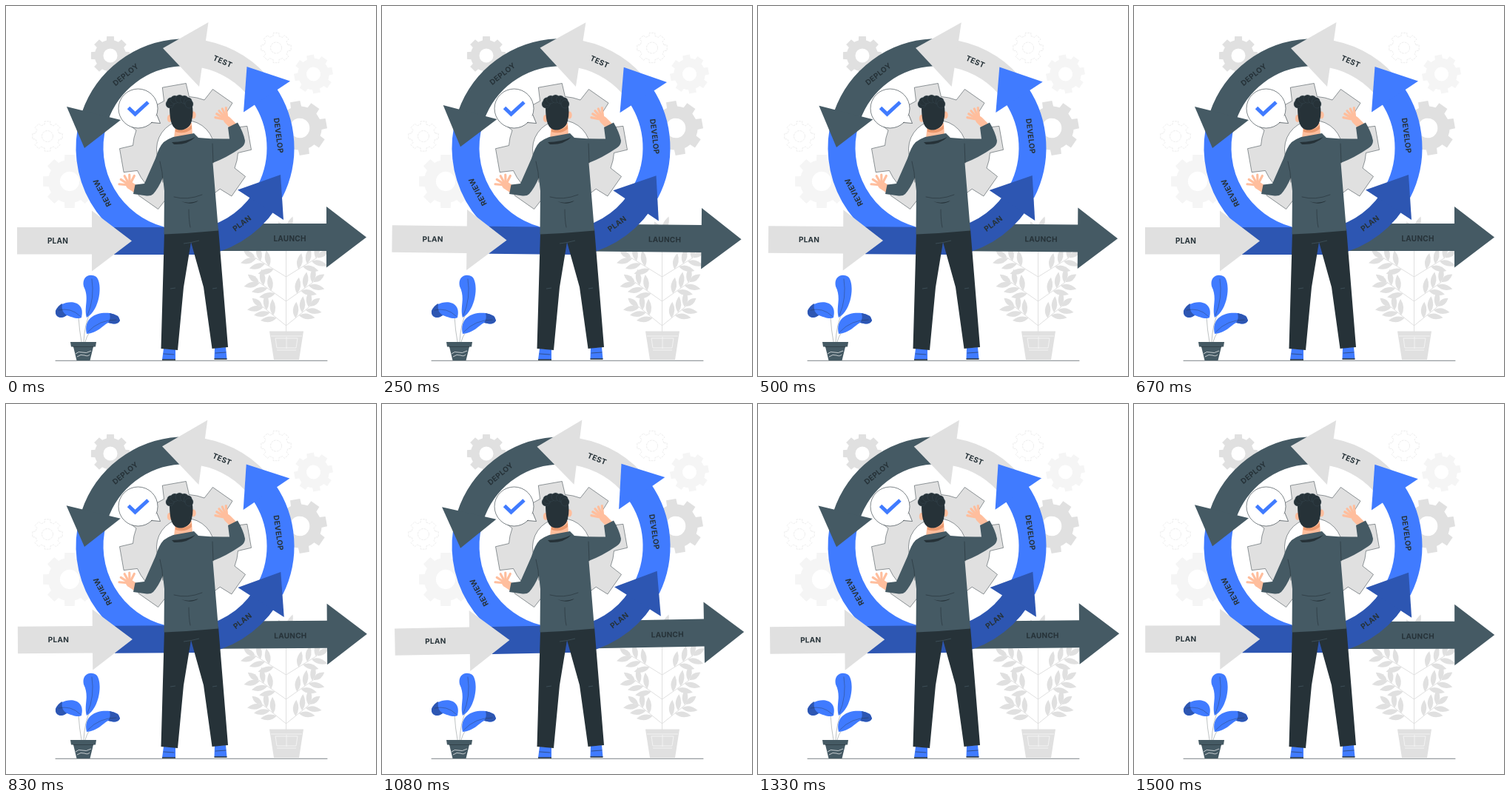
An HTML page that plays this animation: 500 by 500 pixels, repeating every 1540 ms.

```html
<!DOCTYPE html>
<html lang="en">
<head>
<meta charset="utf-8">
<title>Development cycle</title>
<style>
html, body { margin: 0; width: 100%; height: 100%; overflow: hidden; background: #fff }
svg { display: block; width: 100%; height: 100% }
text { font: 700 10px Inter, "Open Sans", sans-serif; letter-spacing: .25px; fill: #263238; text-anchor: middle }
.line { fill: none; stroke: #263238; stroke-width: .6; stroke-linecap: round; stroke-linejoin: round }
.skin { fill: #ffbe9d }
.hand { fill: none; stroke: #ffbe9d; stroke-linecap: round }
</style>
</head>
<body>
<svg viewBox="0 0 500 500">
  <g id="gears"></g>
  <g id="tree" fill="#e0e0e0"></g>
  <g id="cycle"></g>

  <g transform="translate(178.500 138.500)">
    <circle r="26.500" fill="#fff" stroke="#263238" stroke-width=".6"/>
    <path d="M25 9L30 20L18 18" fill="#fff" class="tail"/>
    <path d="M25.500 9L30 20L18 19" class="line"/>
    <path d="M-13 -1L-4 7.500L13.500 -8.500" fill="none" stroke="#407bff" stroke-width="5"/>
  </g>

  <path d="M67 479.300H434" class="line"/>

  <g id="plant">
    <path d="M102 454Q99 438 98 420M105 454Q106 430 114 414M107 454Q110 442 119 434" class="line" stroke-opacity=".5"/>
    <g fill="#407bff">
      <path d="M109 421C105 407 113 395 105 379C102 366 113 360 122 366C131 375 127 411 109 421Z"/>
      <path d="M102 421C97 424 88 420 82 418C74 424 66 420 67 412C74 396 109 394 102 421Z"/>
      <path d="M109 443C104 420 124 413 140 415Q153 417 154 425C151 431 145 430 138 428C130 432 124 442 109 443Z"/>
    </g>
    <path d="M82 418C74 424 66 420 67 412Q70 405 76 402Q74 413 82 418ZM154 425Q151 432 138 428Q142 423 140 415Q153 417 154 425Z" fill="#2d56b2"/>
    <path d="M110 418Q120 395 116 369M100 419Q88 407 71 411M111 440Q126 424 149 424" class="line" stroke-opacity=".6"/>
    <path d="M87 454H122L121 460.500H118L113.500 479H95.500L91 460.500H88Z" fill="#455a64"/>
    <path d="M91 460.500H118" class="line"/>
    <path d="M94 470Q98 466 103 468T115 466M96 474Q101 470 106 472T113 471" fill="none" stroke="#fff" stroke-width=".7"/>
  </g>

  <g id="man">
    <path d="M213 463L229 464V478H211ZM282 462L297 461L298.500 477H281.500Z" fill="#407bff"/>
    <path d="M211 478H229M281.500 477H298.500" stroke="#263238" stroke-width="1.600"/>
    <path d="M213 470L227 471M283 469L297 468" class="line"/>
    <path d="M214 305L287 301L300 461L278.500 463L267 380L250 319L240 380L232 465L209.500 463Z" fill="#263238"/>
    <path d="M240 321Q250 320 261 317M222 382L229 381M279 382L285 381" fill="none" stroke="#455a64" stroke-width=".7"/>
    <g id="hands"></g>

    <path d="M229 160L251 158L252 176L240 183L227 179Z" class="skin"/>
    <path d="M229 166Q242 170 251 161V166Q242 174 229 170Z" fill="#eb996e"/>
    <ellipse cx="221" cy="152" rx="3.200" ry="5" class="skin"/>
    <ellipse cx="253.500" cy="147.500" rx="3.200" ry="5" class="skin"/>
    <path d="M221 132Q236 121 251 132Q254 143 251 155C249 165 240 168 234 167.500C222 166 221 150 221 132Z" fill="#263238"/>
    <g id="curls" fill="#263238" stroke="#455a64" stroke-width=".3"></g>

    <path d="M226 177L254 172L260 178Q281 180 302 179.500L300 164L313 157.500Q321 171 323 182Q323 188 317 192Q298 205 279.500 212L287 303.500Q250 307 213.500 308.500L214 250L212 232Q206 246 199 254Q196 257 190 256.500L172 254L174.500 241.500L187 240L202 206Q207 190 213 184Q218 180 226 177Z" fill="#455a64"/>
    <path d="M224 184Q242 184 256 177Q245 188 227 187Z" fill="#263238"/>
    <path d="M227 258Q245 263 265 255M247 275Q247 290 249 299M208 210Q212 225 212 238M279 186L280 212" class="line"/>
    <path d="M237 264Q248 268 260 263Q250 270 237 264Z" fill="#263238"/>
  </g>
</svg>
<script>
const CX = 242, CY = 191.7, LOOP = 1540, LEAD = 50;
const BLUE = '#407bff', NAVY = '#2d56b2', SLATE = '#455a64', GREY = '#e0e0e0', PALE = '#f5f5f5';
const $ = id => document.getElementById(id);
const add = (id, ...markup) => $(id).insertAdjacentHTML('beforeend', markup.join(''));
const range = (n, make) => Array.from({ length: n }, (_, i) => make(i)).join('');
const polar = (r, deg, x = CX, y = CY) => {
  const a = deg * Math.PI / 180;
  return [x + r * Math.cos(a), y + r * Math.sin(a)].map(v => v.toFixed(2)).join(' ');
};
const shape = (d, fill, extra = '') => `<path d="${d}" fill="${fill}" ${extra}/>`;

// Eight-toothed wheel with a round hole
function gear(x, y, r, fill, turn = 0, hole = r * .36, extra = '') {
  const body = r * .8, at = (radius, a) => polar(radius, a + turn, x, y);
  const rim = range(8, i => {
    const a = i * 45;
    return (i ? `A${body} ${body} 0 0 1 ` : 'M') +
      [at(body, a - 14), at(r, a - 10.5), at(r, a + 10.5), at(body, a + 14)].join('L');
  });
  const half = `A${hole} ${hole} 0 1 0 `;
  return shape(`${rim}ZM${at(hole, 0)}${half}${at(hole, 180)}${half}${at(hole, 0)}Z`, fill, 'fill-rule="evenodd" ' + extra);
}

const faint = 'stroke="#e6e6e6" stroke-width=".7" stroke-dasharray="3 1"';
add('gears',
  gear(141, 67, 26.5, GREY), gear(415.5, 92, 26.5, PALE, -10),
  gear(397, 165, 37, GREY, -10), gear(86, 237, 36.5, PALE),
  gear(365, 56.5, 20.5, 'none', 0, 7.5, faint), gear(56, 176, 20.5, 'none', 0, 7.5, faint),
  gear(242.5, 193.5, 89, GREY, -10, 39, 'stroke="#263238" stroke-width=".5"'));

// Mirrored branches, each with leaves alternating along its length
const leaf = (x, y, n, a) =>
  `<path transform="translate(${x} ${y}) rotate(${a})" d="M0 0Q${n * .45} -8 ${n} 0Q${n * .45} 7 0 0Z"/>`;
function branch(side, level) {
  const base = 366 + level * 33, dx = side * (42 - level * 5), dy = -26;
  const lean = Math.atan2(dy, dx) * 180 / Math.PI;
  return `<path d="M378.500 ${base}l${dx} ${dy}" stroke="${GREY}"/>` + leaf(378.5 + dx, base + dy, 18, lean) +
    range(5, i => {
      const t = .4 + i * .14;
      return leaf(378.5 + dx * t, base + dy * t, 22, lean + (i % 2 ? 48 : -48));
    });
}
add('tree',
  range(6, i => branch(i % 2 ? 1 : -1, i >> 1)),
  leaf(379, 308, 25, -70), leaf(377, 308, 19, -118),
  shape('M378 440V300H379V440Z', GREY), shape('M356 439.500H402L396 478H362Z', GREY),
  '<path d="M358 446H400M364 449H394L392 462H366ZM366 465H392M379 447V463" fill="none" stroke="#fafafa" stroke-width=".7"/>');

// Ring piece between two angles, and a label that follows the ring
const arc = (from, to, color) =>
  `<path d="M${polar(129, from)}A129 129 0 0 1 ${polar(129, to)}" fill="none" stroke="${color}" stroke-width="37"/>`;
const text = (s, place) => `<text transform="${place}" y="3.600">${s}</text>`;
const label = (s, x, y) => text(s, `translate(${x} ${y})`);
const ringLabel = (s, a, turn = 90) => text(s, `translate(${polar(127.5, a)}) rotate(${a + turn})`);
add('cycle',
  arc(105, 195, BLUE),
  arc(-161, -93, SLATE), shape('M82 136L155 154L106 192Z', SLATE),
  arc(-84, -42, GREY), shape('M212 57L273.500 22L261 109Z', GREY),
  arc(-34, 27, BLUE), shape('M325.500 82L384 101.500L321 143.500Z', BLUE),
  shape('M285 294H433V271L487 312.500L433 353.500V331H285Z', SLATE),
  shape('M146 299H262V336H146Z', NAVY), arc(34, 84, NAVY), shape('M371 228L375 289L313 248.500Z', NAVY),
  shape('M15 299H116V276.500L170 317.500L116 358.500V335.500H15Z', GREY),
  label('PLAN', 70, 317), label('LAUNCH', 383.5, 314),
  ringLabel('PLAN', 53, -90), ringLabel('DEVELOP', -7.5), ringLabel('TEST', -66.5),
  ringLabel('DEPLOY', -129), ringLabel('REVIEW', 151.5));

// Open hand: fanned fingers, palm and wrist
const hand = (x, y, wristX, wristY, from, step, reach) =>
  range(5, i => `<path class="hand" stroke-width="3.200" d="M${x} ${y}L${polar(reach, from + i * step, x, y)}"/>`) +
  `<path class="hand" stroke-width="10" d="M${x} ${y}L${wristX} ${wristY}"/>`;
add('hands', hand(167, 242, 176, 248, 185, 28, 14), hand(299, 154, 308, 163, 192, 18, 16.5));
add('curls', range(7, i => {
  const [x, y] = polar(1, 180 + i * 30, 0, 0).split(' ');
  return `<circle cx="${234.5 + 13 * x}" cy="${132.5 + 7 * y}" r="5.500"/>`;
}));

// Linear swing between +1 and -1 degree
const swing = t => 1 - 4 * Math.abs(((t + LEAD) / LOOP + .25) % 1 - .5);
const start = performance.now();
function draw(now) {
  const angle = swing(Math.max(0, now - start)) - swing(0);
  $('cycle').setAttribute('transform', `rotate(${angle} 251 190)`);
  requestAnimationFrame(draw);
}
draw(start);
</script>
</body>
</html>
```
